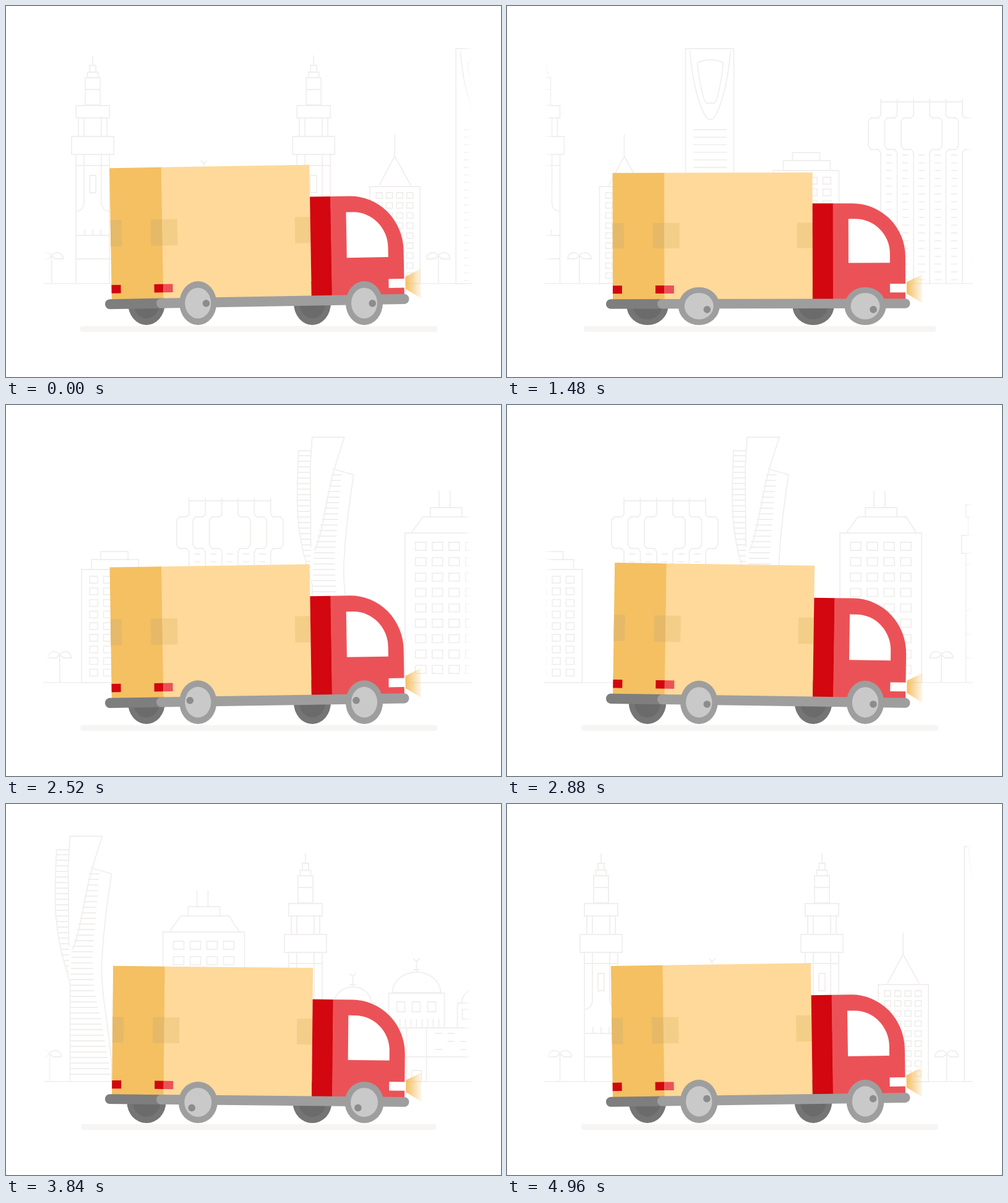
Animation of 800 by 600 pixels, one loop 5000 ms. Source, as an HTML page with a canvas:

```html
<!DOCTYPE html>
<html lang="en">
<head>
<meta charset="utf-8">
<title>Delivery truck</title>
<style>
  html, body { margin: 0; width: 100%; height: 100%; overflow: hidden; background: #fff; }
  canvas { display: block; }
</style>
</head>
<body>
<canvas id="stage" width="800" height="600"></canvas>
<script>
const ctx = document.getElementById('stage').getContext('2d');
const LOOP = 5000, CITY = 1482, GROUND = 449;
const LEFT = 60, RIGHT = 753;
const city = new Path2D();

// ---- Skyline helpers (all outlines go into one path) ----
function line(...p) {
  city.moveTo(p[0], p[1]);
  for (let i = 2; i < p.length; i += 2) city.lineTo(p[i], p[i + 1]);
}
const box = (x1, y1, x2, y2) => city.rect(x1, y1, x2 - x1, y2 - y1);
const shape = (x, d) => city.addPath(new Path2D(d), new DOMMatrix([1, 0, 0, 1, x, 0]));
function windows(x, y, cols, rows, dx, dy, w, h) {
  for (let c = 0; c < cols; c++)
    for (let r = 0; r < rows; r++) city.rect(x + c * dx, y + r * dy, w, h);
}

function minaret(c) {
  line(c, 80, c, 96);
  [[5, 96, 107], [8.5, 107, 116], [12, 116, 160], [27, 161, 181], [34, 211, 240]]
    .forEach(([w, top, bottom]) => box(c - w, top, c + w, bottom));
  line(c - 12, 135, c + 12, 135);
  for (const s of [-1, 1]) {
    line(c + s * 23, 181, c + s * 23, 210);
    line(c + s * 14, 181, c + s * 14, 210);
    line(c + s * 27, 240, c + s * 27, GROUND);
    line(c + s * 14, 240, c + s * 14, 320, c + s * 18, 329, c + s * 27, 333);
  }
  box(c - 5, 274, c + 5, 302);
  for (const y of [258, 371, 409]) line(c - 27, y, c + 27, y);
  for (const x of [-13, 0, 13]) line(c + x, 361, c + x, 371);
}

function dome(c, r, top, base) {
  city.moveTo(c - r, base);
  city.ellipse(c, base, r, base - top, 0, Math.PI, 2 * Math.PI);
  city.closePath();
  line(c, top, c, top - 16);
  line(c - 5, top - 22, c, top - 17, c + 5, top - 22);
  line(c - 5, top - 4, c + 5, top - 4);
}

function mosque(c) {
  dome(c, 39, 272, 305);
  box(c - 45, 306, c + 45, 362);
  windows(c - 32, 320, 3, 1, 25, 1, 13, 16);
  for (let x = -36; x <= 36; x += 9) line(c + x, 348, c + x, 362);
  box(c - 8, 431, c + 8, GROUND);
  line(c - 151, 409, c + 151, 409);
  for (const s of [-1, 1]) {
    const d = c + s * 103;
    dome(d, 30, 296, 322);
    box(d - 37, 322, d + 37, 362);
    windows(d - 29, 332, 3, 1, 22, 1, 14, 16);
    line(c + s * 16, 362, c + s * 16, GROUND);
    line(c + s * 16, 362, c + s * 151, 362);
    for (let i = 0; i < 12; i++) {
      const x = c + s * (30 + (i >> 1) * 20), y = 371 + (i * 2 % 3) * 13;
      line(x, y, x + s * 11, y);
    }
  }
}

function tree(c) {
  line(c, GROUND, c, 404);
  shape(c, 'M-19 409C-18 397-4 396 0 404C4 396 18 397 19 409H6L0 404L-6 409Z');
}

function spireBlock(c) {
  line(c, 208, c, 243);
  line(c - 25, 290, c, 243, c + 26, 290);
  box(c - 40, 292, c + 41, GROUND);
  windows(c - 30, 302, 4, 9, 16.5, 16.2, 10, 9);
}

function archTower(x) {
  box(x, 69, x + 78, GROUND);
  shape(x, 'M7 72C11 130 28 184 40 184C52 184 68 130 73 72' +
           'M19 92Q40 82 61 92C58 125 50 157 46 157H34C30 157 22 125 19 92');
  for (let y = 200; y < 445; y += 12.2) line(x + 13, y, x + 67, y);
}

function steppedBlock(x) {
  box(x, 266, x + 106, GROUND);
  box(x + 16, 250, x + 92, 266);
  box(x + 31, 237, x + 75, 250);
  windows(x + 13, 277, 4, 9, 22.3, 18.8, 13, 11);
}

function waterTowers(c) {
  line(c - 66, 155, c + 66, 155);
  for (const s of [-1, 1])
    for (const neck of [13, 39.5, 66]) {
      const a = c + s * neck, b = a + s * 20;
      line(a, 150, a, 177, a + s * 4, 181, b - s * 4, 181, b, 186, b, 226,
           b - s * 4, 232, a + s * 4, 232, a, 237, a, GROUND);
    }
  for (let i = -2; i <= 2; i++)
    for (let y = 241; y < 448; y += 12.6) line(c + i * 26.3 - 5, y, c + i * 26.3 + 5, y);
}

// Linear interpolation through [y, x] points
function along(points, y) {
  let i = 1;
  while (i < points.length - 1 && points[i][0] < y) i++;
  const [y0, x0] = points[i - 1], [y1, x1] = points[i];
  return x0 + (x1 - x0) * (y - y0) / (y1 - y0);
}

function twistedTower(x) {
  const outer = [[73, -22], [180, -25], [240, -14], [290, 0]];
  const fold = [[104, 33], [175, 18], [230, 4], [290, 0], [450, 0]];
  const inner = [[104, 48], [190, 41], [250, 36], [300, 39], [360, 52], [450, 68]];
  shape(x, 'M0 74H-22C-24 130-28 180-14 240L0 290V449' +
           'M-2 230L-3 100L0 52H52C42 85 34 105 27 140C20 175 14 215 4 235' +
           'M33 103L67 113C60 160 54 200 51 260C50 310 62 350 67 420V449');
  for (let y = 82; y < 285; y += 9) line(x + along(outer, y), y, x - 2, y);
  for (let y = 113; y < 446; y += 9) line(x + along(fold, y), y, x + along(inner, y), y);
}

function hippedBlock(x) {
  box(x, 207, x + 132, GROUND);
  line(x + 11, 206, x + 29, 181, x + 107, 181, x + 123, 206);
  box(x + 41, 166, x + 92, 181);
  line(x + 55, 139, x + 55, 166);
  line(x + 73, 139, x + 73, 166);
  windows(x + 17, 222, 4, 9, 27, 24.9, 17, 13);
}

minaret(140.5);
mosque(320);
minaret(497.5);
spireBlock(628.5);
archTower(727.5);
steppedBlock(869.5);
waterTowers(1109);
twistedTower(1242);
hippedBlock(1392);
[74, 556, 699, 834, 1209].forEach(tree);

// ---- Painting ----
function fill(color, x1, y1, x2, y2, radius = 0) {
  ctx.fillStyle = color;
  ctx.beginPath();
  ctx.roundRect(x1, y1, x2 - x1, y2 - y1, radius);
  ctx.fill();
}
function disc(color, x, y, rx, ry) {
  ctx.fillStyle = color;
  ctx.beginPath();
  ctx.ellipse(x, y, rx, ry, 0, 0, 2 * Math.PI);
  ctx.fill();
}
function fillPath(color, d) {
  ctx.fillStyle = color;
  ctx.fill(new Path2D(d));
}
function fade(from, to) {
  const g = ctx.createLinearGradient(from, 0, to, 0);
  g.addColorStop(0, '#fff');
  g.addColorStop(1, '#fff0');
  fill(g, Math.min(from, to), 40, Math.max(from, to), 460);
}

function drawCity(p) {
  ctx.save();
  ctx.beginPath();
  ctx.rect(LEFT, 0, RIGHT - LEFT, 600);
  ctx.clip();
  ctx.strokeStyle = '#f1efee';
  ctx.lineWidth = 1.8;
  for (const copy of [0, CITY]) {
    ctx.save();
    ctx.translate(copy - p * CITY, 0);
    ctx.stroke(city);
    ctx.restore();
  }
  fade(LEFT, LEFT + 14);
  fade(RIGHT, RIGHT - 14);
  fill('#f1efee', LEFT, GROUND - 1, RIGHT, GROUND + 0.5);
  ctx.restore();
}

function drawWheel(x, bounce, rim, hub, angle) {
  const rx = 31.8 - 1.8 * bounce, ry = 33 + 2.5 * bounce, y = 516 - ry;
  disc(rim, x, y, rx, ry);
  disc(hub, x, y, rx * 0.7, ry * 0.7);
  if (angle !== undefined)
    disc('#8c8c8c', x + Math.cos(angle) * rx * 0.44, y + Math.sin(angle) * ry * 0.39, 5.8, 5.8);
}

function drawBody(bounce, stretch, tilt) {
  ctx.save();
  ctx.translate(405, 479.8 - 1.8 * bounce);
  ctx.rotate(tilt * Math.PI / 180);
  ctx.scale(1, stretch);
  ctx.translate(-405, -481.7);

  const glow = ctx.createLinearGradient(646, 0, 671, 0);
  glow.addColorStop(0, '#f4c062');
  glow.addColorStop(1, '#f4c06222');
  fillPath(glow, 'M646 447L671 435V481L646 466Z');

  fill('#f4c062', 171, 270, 255, 475);
  fill('#fed99a', 254.5, 270, 494, 475);
  fill('#e5b967', 171, 351, 189, 392);
  fill('#e5b967', 236, 351, 254.5, 392);
  fill('#f3ce88', 254.5, 351, 279, 392);
  fill('#f3ce88', 469, 351, 494, 392);
  fill('#d2070f', 171, 452, 186, 465);
  fill('#d2070f', 240, 452, 254.5, 465);
  fill('#eb5257', 254.5, 452, 270, 465);

  fill('#d2070f', 494, 320, 527.5, 475);
  fillPath('#eb5257', 'M527 320H558A86 86 0 0 1 644 406V475H527Z');
  fillPath('#fff', 'M552 345H563A56 56 0 0 1 619 401V416H552Z');
  fill('#fff', 619, 450, 645, 464);

  fill('#7e7e7e', 160, 474, 262, 489.5, 7.7);
  fill('#9e9e9e', 243, 474, 651.5, 489.5, 7.7);
  ctx.restore();
}

function draw(now) {
  const p = now % LOOP / LOOP;
  const sway = p * 6 % 1;
  const swing = sway * 4 * Math.PI;
  const bounce = Math.cos(swing);
  const stretch = 1.0185 + 0.0205 * Math.cos(swing + 0.26); // runs slightly ahead of the wheels
  const tilt = 1 - 4 * Math.abs(sway - 0.5);
  const angle = p * 14 * Math.PI + 0.02;

  ctx.fillStyle = '#fff';
  ctx.fillRect(0, 0, 800, 600);
  drawCity(p);
  fill('#f6f5f4', 122 - 2 * bounce, 517.5, 695 + 2 * bounce, 527, 4);
  for (const x of [227, 495]) drawWheel(x, bounce, '#757575', '#6b6b6b');
  drawBody(bounce, stretch, tilt);
  for (const x of [310.3, 579]) drawWheel(x, bounce, '#9e9e9e', '#c9c9c9', angle);
}

const start = performance.now();
function tick() {
  draw(performance.now() - start);
  requestAnimationFrame(tick);
}
tick();
</script>
</body>
</html>
```
